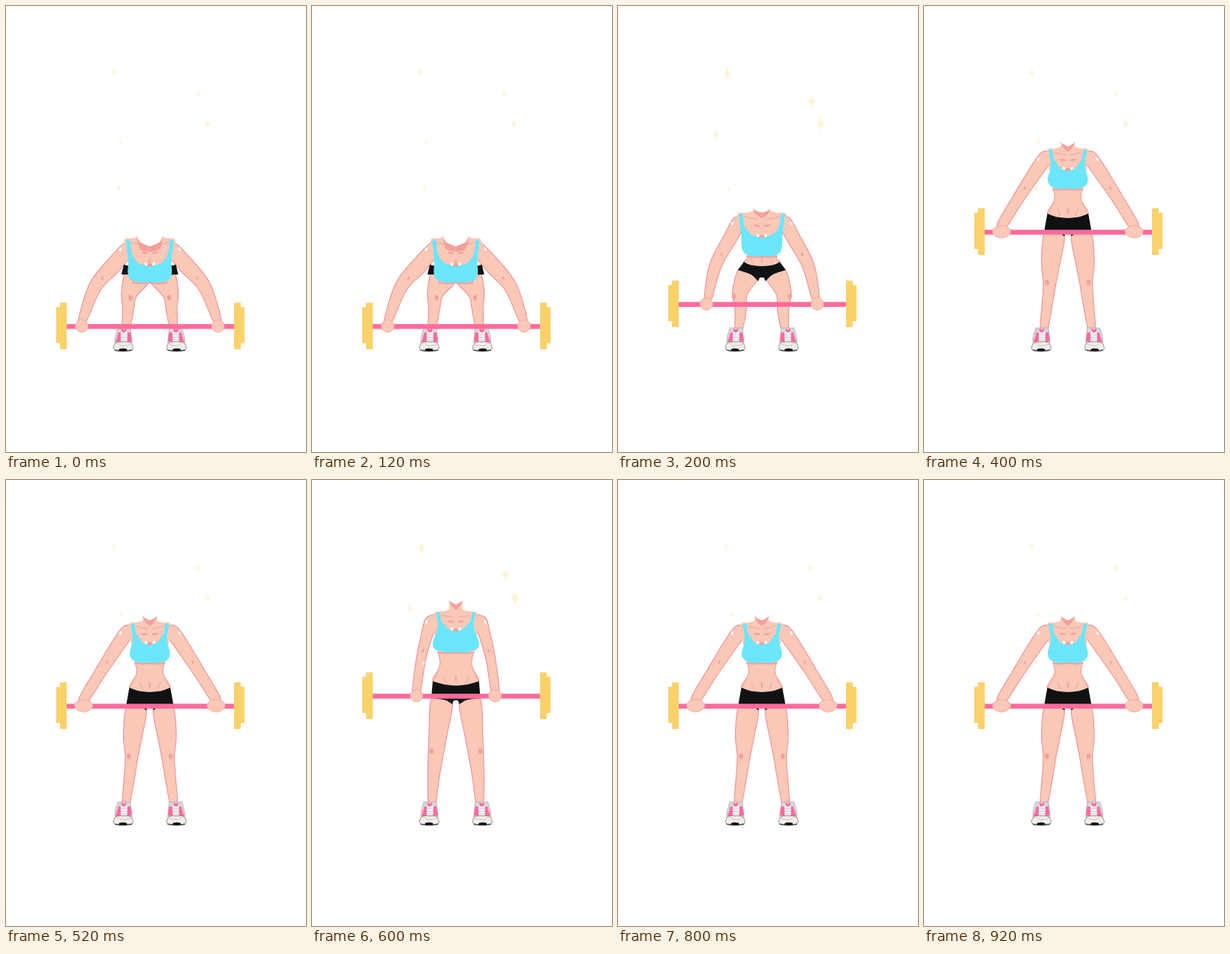
Write an HTML page with a canvas that moves like this. It is 400 px wide and 593 px high and loops after 1 s.

```html
<!DOCTYPE html>
<html lang="en">
<head>
<meta charset="utf-8">
<title>Barbell lift</title>
<style>
html, body { margin: 0; width: 100%; height: 100%; overflow: hidden; background: #fff; }
canvas { display: block; width: 100%; height: 100%; }
</style>
</head>
<body>
<canvas id="stage"></canvas>
<script>
const W = 400, H = 593, AXIS = 191.8, MID = AXIS + 0.4, STEP = 200;
const SKIN = '#f9c8b7', LINE = '#ef9096', SHADE = '#f3a09d', CYAN = '#6be6fb';
const BLACK = '#101112', PINK = '#ff6b9c', GOLD = '#fad269', GLINT = '#fff4d6';

const canvas = document.getElementById('stage');
const ctx = canvas.getContext('2d');

// Each run of points is smooth; runs meet in corners.
function curve(...runs) {
  const path = new Path2D();
  runs.forEach((pts, n) => {
    if (n) path.lineTo(...pts[0]); else path.moveTo(...pts[0]);
    for (let i = 0; i < pts.length - 1; i++) {
      const b = pts[i], c = pts[i + 1], a = pts[i - 1] || b, d = pts[i + 2] || c;
      path.bezierCurveTo(
        b[0] + (c[0] - a[0]) / 6, b[1] + (c[1] - a[1]) / 6,
        c[0] - (d[0] - b[0]) / 6, c[1] - (d[1] - b[1]) / 6, c[0], c[1]);
    }
  });
  return path;
}

function fill(path, color, edge, width = 1) {
  ctx.fillStyle = color;
  ctx.fill(path);
  if (edge) stroke(path, edge, width);
}

function stroke(path, color, width = 1) {
  ctx.strokeStyle = color;
  ctx.lineWidth = width;
  ctx.stroke(path);
}

function oval(x, y, rx, ry, turn = 0, color = SHADE, edge) {
  const path = new Path2D();
  path.ellipse(x, y, rx, ry, turn, 0, 2 * Math.PI);
  fill(path, color, edge);
}

function mirrored(draw) {
  draw();
  ctx.save();
  ctx.translate(2 * AXIS, 0);
  ctx.scale(-1, 1);
  draw();
  ctx.restore();
}

// Round-ended limb around joints of [x, y, width].
function limb(joints) {
  const last = joints.length - 1, left = [], right = [];
  let head, tail;
  joints.forEach(([x, y, w], i) => {
    const a = joints[Math.max(i - 1, 0)], b = joints[Math.min(i + 1, last)];
    const len = Math.hypot(b[0] - a[0], b[1] - a[1]);
    const dx = (b[0] - a[0]) / len * w / 2, dy = (b[1] - a[1]) / len * w / 2;
    left.push([x + dy, y - dx]);
    right.unshift([x - dy, y + dx]);
    if (!i) head = [x - dx, y - dy];
    tail = [x + dx, y + dy];
  });
  fill(curve([head, ...left, tail, ...right, head]), SKIN, LINE, 1.1);
}

// neck: x, y, notch    strap: x, y       cup: side x, neckline y, bottom y
// waist: x, y          shorts: band x, y, hem x, y, inseam y
const poses = {
  deep: {
    top: 394.4, neck: [174, 305, 320], strap: [160, 311.5], cup: [162.5, 345, 367],
    waist: [168, 352], shorts: [157, 344, 154, 357, 362], hand: [101, 8.5], knee: [166, 388],
    arm: [[168, 317, 16], [143, 345, 21], [119, 373, 17], [102, 417, 11]],
    leg: [[176, 358, 34], [164, 383, 21], [163, 402, 15], [160, 429, 10]]
  },
  rise: {
    top: 365, neck: [180, 269.5, 275], strap: [161, 277], cup: [165, 307, 332],
    waist: [172, 336], shorts: [168, 340, 160, 351, 366], hand: [118, 8.5], knee: [154.5, 386],
    arm: [[162, 286, 17], [150, 308, 18], [130, 345, 16], [120, 389, 10]],
    leg: [[174, 355, 28], [162.5, 382, 20], [163.5, 404, 15], [161, 429, 10]]
  },
  pull: {
    top: 269, neck: [182, 181, 187], strap: [166, 191.5], cup: [165, 218, 242.5],
    waist: [174, 257], shorts: [164.5, 276, 160.5, 298, 306], hand: [103.5, 12], knee: [164, 367.5],
    arm: [[163, 200, 17], [149, 220, 18], [125, 257, 15], [104, 291, 13]],
    leg: [[174, 303, 27], [169, 340, 25], [167.5, 368, 17], [164.5, 395, 14], [160, 429, 10]]
  },
  stand: {
    top: 255.7, neck: [182.5, 160, 166], strap: [165, 176.5], cup: [161, 200, 228.5],
    waist: [170.5, 246], shorts: [161, 267.5, 159, 290, 298], hand: [139.5, 8.5], knee: [159.5, 360.5],
    arm: [[160, 187, 18], [153, 207, 15], [145, 240, 12.5], [139, 283, 10.5]],
    leg: [[173, 294, 29], [168, 338, 24], [165, 365, 20], [162, 395, 15.5], [160, 429, 10]]
  }
};
const cycle = [poses.deep, poses.rise, poses.pull, poses.stand, poses.pull];

function shoe() {
  fill(curve([[149, 428], [166, 428]], [[168, 448], [146, 448], [149, 428]]), '#d9d5dc', '#aba5af', 0.7);
  fill(curve([[150, 434], [154, 434]], [[153, 447], [146, 447]]), PINK);
  fill(curve([[162, 434], [166, 434]], [[168, 446], [161, 447]]), PINK);
  ctx.fillStyle = '#f8f6f8';
  ctx.fillRect(153, 433, 8.5, 17);
  for (let y = 437; y < 448; y += 3.5) stroke(curve([[153, y], [161, y]]), '#bcb4c1', 0.8);
  for (const side of [-1, 1]) oval(157 + side * 1.4, 431.6, 1.5, 2.8, side * 0.6, PINK);
  fill(curve([[143.3, 455], [146, 447.5], [156, 446.5], [166, 447.5], [169.3, 455], [165, 458.5], [156, 459], [147, 458.5], [143.3, 455]]),
    '#efedef', '#6d6870', 0.7);
  stroke(curve([[144.5, 450.5], [149, 448], [154, 451.5], [162, 451], [168, 449]]), '#dcc892');
  stroke(curve([[145, 457.5], [156, 458.8], [168, 457.5]]), BLACK, 1);
  oval(156, 457, 5.5, 1.7, 0, BLACK);
}

function torso({ neck: [nx, ny, notch], strap: [sx, sy], cup: [side, low, bottom], waist, shorts: [bx, by] }) {
  fill(curve(
    [[nx, ny], [nx + 5, ny + (notch - ny) * 0.6], [MID, notch]],
    [[MID, by + 7], [bx, by], waist, [side + 7, bottom]],
    [[side + 2, low], [sx - 2, sy + 1], [(sx + nx) / 2, sy - 2], [nx, sy - 4.5], [nx, ny]]), SKIN);
  fill(curve([[nx, ny], [nx + 5, ny + (notch - ny) * 0.6], [MID, notch]], [[MID, notch + 7], [nx + 5, notch + 3], [nx, ny]]), SHADE);
  stroke(curve([[side + 7, bottom], waist, [bx, by]]), LINE);
  stroke(curve([[side + 7, bottom + 1], [181, bottom + 2], [MID, bottom + 1]]), SHADE, 2);
  stroke(curve([[waist[0] + 4, by - 7], [waist[0] + 8, by + 2]]), SHADE);
  oval(AXIS, by - 3, 1, 4, 0);
  stroke(curve([[sx + 8, sy + 3], [sx + 15, sy + 5], [sx + 23, sy + 6]]), SHADE);
  oval(185, (sy + low) / 2, 4.2, 1.3, 0.1);
}

function bra({ strap: [x, y], cup: [side, low, bottom] }) {
  fill(curve(
    [[x, y], [x + 5.5, y - 0.5]],
    [[x + 7, y + (low - y) * 0.45], [x + 13, low - 6], [183, low - 1], [MID, low]],
    [[MID, bottom], [180, bottom + 0.7], [side + 4, bottom - 3], [side, bottom - 12], [x + 3, low - 6], [x, y]]), CYAN);
  oval(AXIS, low - 0.5, 3, 2);
  oval(186.5, low - 2, 1.6, 2.3, -0.4, '#fff');
}

function shorts([bx, by, hx, hy, inseam]) {
  fill(curve(
    [[bx, by], [177, by + 4.5], [MID, by + 6]],
    [[MID, inseam - 5], [189, inseam - 5]],
    [[187, inseam], [177, (hy + inseam) / 2 - 1.5], [hx, hy]]), BLACK);
}

function bar(top) {
  ctx.fillStyle = PINK;
  ctx.fillRect(80, top + 28.5, 225, 6.5);
  ctx.fillStyle = GOLD;
  for (const [thick, thin] of [[72, 67], [304, 312]]) {
    ctx.fillRect(thick, top, 9, 62);
    ctx.fillRect(thin, top + 6, 6, 48);
  }
}

function figure(p) {
  const [, , upper, lower] = [0, 0, p.arm[1], p.arm[2]];
  mirrored(() => {
    limb(p.leg);
    oval(...p.knee, 2.7, 3.8);
    shoe();
    limb(p.arm);
    oval(upper[0] * 0.4 + lower[0] * 0.6, upper[1] * 0.4 + lower[1] * 0.6, 1.3, 2.4, 0.3);
    oval(152.5, p.strap[1] + 12, 1.4, 2.6, 0.5, '#fff');
  });
  mirrored(() => torso(p));
  mirrored(() => shorts(p.shorts));
  mirrored(() => bra(p));
  bar(p.top);
  mirrored(() => oval(p.hand[0], p.top + 31, p.hand[1], 8.3, 0, SKIN, '#f4aca6'));
}

// Resting place and size, then drift and growth on alternate beats.
const sparkles = [
  { x: 144, y: 88, r: 6.5, dx: 2, dy: 2, grow: 4 },
  { x: 256.5, y: 117, r: 6, dx: 1.5, dy: 9.5, grow: 4 },
  { x: 269, y: 157, r: 7.5, dx: 1.5, dy: -0.5, grow: 4 },
  { x: 152.5, y: 180, r: 5.5, dx: -21.5, dy: -9, grow: 2 },
  { x: 150, y: 243, r: 6.5, dx: -1.5, dy: 0.5, grow: -2 }
];

function sparkle(s, beat) {
  const r = s.r + s.grow * beat, pinch = r * (beat ? 0.15 : 0.08);
  ctx.save();
  ctx.translate(s.x + s.dx * beat, s.y + s.dy * beat);
  ctx.scale(0.62, 1);
  ctx.fillStyle = GLINT;
  ctx.beginPath();
  ctx.moveTo(r, 0);
  for (let i = 1; i <= 4; i++) {
    const a = i * Math.PI / 2, b = a - Math.PI / 4;
    ctx.quadraticCurveTo(pinch * Math.cos(b), pinch * Math.sin(b), r * Math.cos(a), r * Math.sin(a));
  }
  ctx.fill();
  ctx.restore();
}

function frame(now) {
  const n = Math.floor(now / STEP) % cycle.length;
  const dpr = devicePixelRatio || 1;
  const w = Math.round(innerWidth * dpr), h = Math.round(innerHeight * dpr);
  if (canvas.width !== w || canvas.height !== h) {
    canvas.width = w;
    canvas.height = h;
  }
  ctx.setTransform(w / W, 0, 0, h / H, 0, 0);
  ctx.lineCap = 'round';
  ctx.fillStyle = '#fff';
  ctx.fillRect(0, 0, W, H);
  figure(cycle[n]);
  sparkles.forEach(s => sparkle(s, n % 2));
  requestAnimationFrame(frame);
}

frame(0);
</script>
</body>
</html>
```
